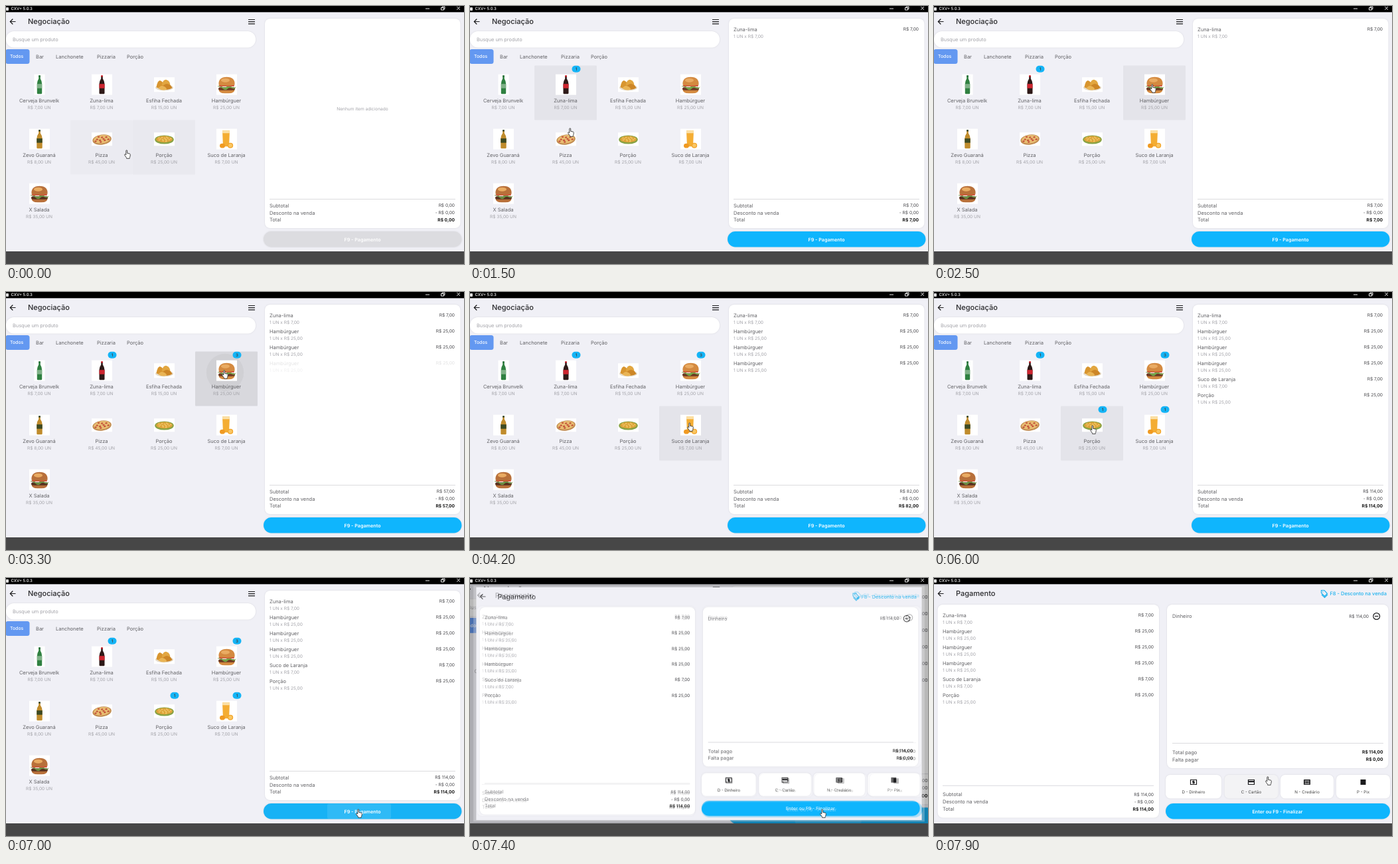
Recreate the animation shown at these times as an HTML page. Size 690 by 388 pixels, loop 8 s.

```html
<!DOCTYPE html>
<html lang="pt-BR">
<head>
<meta charset="utf-8">
<title>Negociação</title>
<style>
  html, body { margin: 0; width: 100%; height: 100%; overflow: hidden; background: #474747; }
  svg { display: block; width: 690px; height: 388px; }
  text { font: 400 7.5px Inter, "Open Sans", sans-serif; fill: #626266; text-rendering: geometricPrecision; white-space: pre; }
  .h { font-size: 11px; font-weight: 500; fill: #2a2a2d; }
  .g { font-size: 6.6px; fill: #a4a4aa; }
  .v { font-size: 6.6px; fill: #4a4a4e; }
  .b { font-size: 6.7px; font-weight: 700; fill: #1a1a1a; }
  .w { font-size: 7.2px; font-weight: 600; fill: #fff; }
  .s { font-size: 6.2px; fill: #444; }
  .m { text-anchor: middle; }
  .e { text-anchor: end; }
  .tab { font-size: 6.9px; font-weight: 500; }
  .hint { font-size: 7.4px; }
  .app { font-size: 6px; font-weight: 500; }
  .link { fill: #1fb2ee; font-weight: 500; }
  .card { fill: #fff; filter: drop-shadow(0 .6px 1px rgba(0,0,0,.1)); }
  .line { fill: none; stroke: #d2d2d6; stroke-width: .8; }
  .ico { fill: none; stroke: #1c1c1e; stroke-width: 1.2; }
  .zoom { transform-origin: 345px 189px; }
</style>
</head>
<body>
<svg id="stage" viewBox="0 0 690 388"></svg>
<script>
const LOOP = 8000;
const BG = '#f0f0f6', BLUE = '#0fb5fd';

// name, price, picture
const products = [
  ['Cerveja Brunvelk', 7, 'beer'], ['Zuna-lima', 7, 'soda'],
  ['Esfiha Fechada', 15, 'pastry'], ['Hambúrguer', 25, 'burger'],
  ['Zevo Guaraná', 8, 'guarana'], ['Pizza', 45, 'pizza'],
  ['Porção', 25, 'portion'], ['Suco de Laranja', 7, 'juice'],
  ['X Salada', 35, 'salad']
];

// time, product index
const clicks = [[1000, 1], [2550, 3], [2850, 3], [3200, 3], [4400, 7], [5500, 6]];

// time, x, y
const path = [
  [-300, 250, 221], [-130, 188, 223], [0, 183, 223], [700, 146, 126], [1300, 146, 126],
  [1500, 152, 190], [1850, 205, 186], [2300, 330, 124], [3450, 330, 124],
  [4150, 332, 203], [4800, 332, 203], [5100, 296, 209], [5400, 240, 207],
  [6050, 240, 207], [6800, 532, 354], [7500, 532, 354], [7800, 499, 290],
  [7900, 504, 305], [8000, 504, 305]
];

const money = n => `R$ ${n},00`;
const ramp = (t, from, len) => Math.min(1, Math.max(0, (t - from) / len));
const text = (x, y, s, cls = '', id = '') =>
  `<text x="${x}" y="${y}" dy=".36em" class="${cls}"${id && ` id="${id}"`}>${s}</text>`;
const rect = (x, y, w, h, r = 0, extra = '') =>
  `<rect x="${x}" y="${y}" width="${w}" height="${h}" rx="${r}" ${extra}/>`;
const fill = c => `fill="${c}"`;
const shape = (d, c) => `<path d="${d}" fill="${c}"/>`;
const oval = (x, y, rx, ry, c) => `<ellipse cx="${x}" cy="${y}" rx="${rx}" ry="${ry}" fill="${c}"/>`;
const hline = (x1, x2, y) => `<path class="line" d="M${x1} ${y}H${x2}"/>`;
const white = (w, h) => rect(-w / 2, -h / 2, w, h, 0, fill('#fff'));

function bottle(w, body, label, cap) {
  return shape(`M-1.3 -13H1.3V-9Q${w} -5 ${w} -1V12.5Q${w} 14 ${w - 1.2} 14H${1.2 - w}Q${-w} 14 ${-w} 12.5V-1Q${-w} -5 -1.3 -9Z`, body) +
    rect(-w, -1, 2 * w, 6.5, 0, fill(label)) + rect(-1.5, -14, 3, 2.4, .5, fill(cap));
}

function burger(bun, leaf, meat) {
  return white(31, 31) +
    shape('M-12 7H12Q12 13 3 13H-3Q-12 13 -12 7Z', bun) +
    rect(-12.5, 4, 25, 4.5, 2.2, fill(meat)) +
    shape('M-14.5 3Q-11 0 -7 3T0 3T7 3T14.5 3Q12 8 8 5.5T1 6.5T-6 6T-14.5 3Z', leaf) +
    rect(-11.5, .3, 23, 2.4, 1.2, fill('#d2553a')) +
    shape('M-12 .5Q-13 -11.5 0 -11.5T12 .5Q0 2.5 -12 .5Z', bun) +
    oval(-2, -6.5, 6.5, 3, '#e9ab62');
}

const dots = (n, rx, ry, c, r) => Array.from({ length: n }, (_, i) => {
  const a = i * 2.4, k = Math.sqrt((i + .5) / n);
  return oval((Math.cos(a) * k * rx).toFixed(1), (Math.sin(a) * k * ry).toFixed(1), r, r * .7, c);
}).join('');

const pictures = {
  beer: white(16, 31) + bottle(3.7, '#2f8040', '#7fb187', '#27703a'),
  soda: white(31, 31) + bottle(4, '#2e1a18', '#cf2630', '#c9202a'),
  guarana: white(31, 31) + bottle(4.2, '#c08c2c', '#3c4a24', '#2e3f22'),
  pastry: white(31, 22) + oval(0, 4.5, 13.5, 4.5, '#e6dccb') +
    shape('M-12 4Q-10 -7 -6 -6T1 3Q-5 8 -12 4Z', '#d8952f') +
    shape('M-4 0Q-1 -9 4 -7T9 2Q2 5 -4 0Z', '#e2a640') +
    shape('M-5 6Q0 -2 5 -1T12 5Q4 10 -5 6Z', '#cd8627') +
    shape('M-9 6Q-6 1 -2 2T4 7Q-2 10 -9 6Z', '#e9b455'),
  burger: burger('#d48a40', '#74a548', '#6d3a24'),
  salad: burger('#b8703a', '#6d9044', '#56301f'),
  pizza: white(31, 20) + '<g transform="rotate(-8)">' + oval(0, .8, 14.3, 7.6, '#c08a50') +
    oval(0, .2, 12.5, 6.2, '#e8bd72') + dots(10, 11, 5.2, '#c4523a', 1.7) + '</g>',
  portion: white(31, 20) + oval(0, .8, 14.3, 6.6, '#88a345') + oval(0, .2, 12.3, 4.8, '#dca338') + dots(14, 10, 3.8, '#efc667', 1.3),
  juice: white(31, 31) + shape('M-6.5 -13H4.5L3.5 11H-5.5Z', '#f4ad33') +
    shape('M-6.5 -13H4.5L4.3 -9H-6.3Z', '#fbe0a6') +
    oval(-6.5, 10, 4, 3.4, '#f09a22') + oval(5.5, 9.5, 4.2, 4, '#f3a52c') + oval(5.5, 9.5, 2.8, 2.6, '#f9c765')
};

const tileBox = i => ({ x: 3 + 94 * (i % 4), y: 89.5 + 82 * Math.floor(i / 4), w: 94, h: 82 });

function tile([name, price, pic], i) {
  const { x, y, w, h } = tileBox(i), cx = x + 47;
  return rect(x, y, w, h, 1, `id="hover${i}" opacity="0"`) +
    `<circle id="ripple${i}" opacity="0"/>` +
    `<g transform="translate(${cx + .5} ${y + 28.7})">${pictures[pic]}</g>` +
    text(cx, y + 52.5, name, 'm') + text(cx, y + 63.2, money(price) + ' UN', 'g m') +
    `<g id="badge${i}" opacity="0">` + rect(cx + 9.5, y + .3, 13, 10, 5, fill('#14b4f6')) +
    text(cx + 16, y + 5.3, '1', 'w s m', `count${i}`) + '</g>';
}

const cartRows = (x, right, y, id) => clicks.map(([, p], i) => {
  const [name, price] = products[p], cy = y + 24 * i;
  return `<g id="${id}${i}">` + text(x, cy, name) + text(right, cy, money(price), 'v e') +
    text(x, cy + 10.8, '1 UN x ' + money(price), 'g') + '</g>';
}).join('');

const totals = (x, right, y, id) =>
  text(x, y, 'Subtotal') + text(right, y, money(114), 'v e', id + 'Sub') +
  text(x, y + 10.8, 'Desconto na venda') + text(right, y + 10.8, '- R$ 0,00', 'v e') +
  text(x, y + 21.6, 'Total') + text(right, y + 21.6, money(114), 'b e', id + 'Sum');

const arrow = '<path class="ico" d="M14.5 23.5H6.5M10.3 19.5L6.3 23.5L10.3 27.5"/>';

const shop = rect(0, 9, 690, 360, 0, fill(BG)) + arrow + text(33, 23.5, 'Negociação', 'h') +
  '<path class="ico" d="M365 20.5H375M365 23.7H375M365 26.9H375"/>' +
  rect(0, 38, 376, 24.5, 12, 'class="card"') + text(10, 50, 'Busque um produto', 'g hint') +
  rect(-.5, 65, 36, 22, 3.5, fill('#6398f1')) + text(6, 76, 'Todos', 'w tab') +
  text(45, 76, 'Bar') + text(75, 76, 'Lanchonete') + text(137, 76, 'Pizzaria') + text(182, 76, 'Porção') +
  products.map(tile).join('') +
  rect(390, 19, 294.5, 315, 8, 'class="card"') +
  text(537, 155, 'Nenhum item adicionado', 'g m', 'empty') +
  cartRows(397, 676, 35, 'row') + hline(397, 677, 290.5) + totals(397, 676, 300, 'cart') +
  rect(388, 339, 298.5, 23.5, 11.7, 'class="card" id="payBtn"') +
  rect(484, 339.5, 96, 22.5, 2, 'fill="#fff" id="payGlow" opacity="0"') +
  text(537, 351, 'F9 - Pagamento', 'w m');

const methods = [
  [349, 84, 'D - Dinheiro'], [437.5, 81, 'C - Cartão'], [522, 80, 'N - Crediário'], [606, 81, 'P - Pix']
];
const icons = [
  '<path class="ico" d="M-4.5 -3.5H4.5V3.5H-4.5Z"/><path class="ico" d="M1.5 -1.5H-1.2V0H1.2V1.5H-1.5M0 -2.4V2.4"/>',
  '<path class="ico" d="M-4.5 -3.5H4.5V3.5H-4.5Z"/>' + rect(-4.5, -2, 9, 2.2, 0, fill('#1c1c1e')),
  rect(-5, -4, 10, 8, .8, fill('#1c1c1e')) + '<path d="M-3.6 -2H3.6M-3.6 2.4H3.6M-2.6 -.8V1.3M0 -.8V1.3M2.6 -.8V1.3" stroke="#fff" stroke-width=".8"/>',
  rect(-4, -4, 8, 8, 0, fill('#1c1c1e'))
];

const pay = rect(0, 9, 690, 360, 0, fill(BG)) + arrow + text(33, 23.5, 'Pagamento', 'h') +
  '<path d="M583.5 18.5H588L592.5 23.5L588.5 27.5L583.5 22.5ZM584 25L588.5 29.5L593 25" fill="none" stroke="#1fb2ee" stroke-width="1.2"/>' +
  '<circle cx="585.8" cy="20.8" r=".8" fill="#1fb2ee"/>' +
  text(682, 23.5, 'F8 - Desconto na venda', 'e link') +
  rect(5.5, 40, 333.5, 320.5, 8, 'class="card"') + cartRows(13, 331, 56, 'paid') +
  hline(13, 331, 312.3) + totals(13, 331, 325.5, 'pay') +
  rect(351, 40, 333.5, 246, 8, 'class="card"') + text(359, 57.5, 'Dinheiro') + text(655, 57.5, money(114), 'v e') +
  '<circle class="ico" cx="666.7" cy="57.5" r="4.9"/><path class="ico" d="M664 57.5H669.4"/>' +
  hline(359, 677, 248.5) +
  text(359, 262, 'Total pago') + text(676.5, 262, money(114), 'b e') +
  text(359, 272.8, 'Falta pagar') + text(676.5, 272.8, money(0), 'b e') +
  methods.map(([x, w, label], i) =>
    rect(x, 296, w, 35.5, 7, `class="card" id="method${i}"`) +
    `<g transform="translate(${x + w / 2} 307)">${icons[i]}</g>` + text(x + w / 2, 322, label, 's m')).join('') +
  rect(349, 339, 338, 23.5, 11.7, `class="card" style="fill:${BLUE}"`) +
  text(517.5, 351, 'Enter ou F9 - Finalizar', 'w m');

const titleBar = rect(0, 0, 690, 9.3, 0, fill('#000')) + rect(0, 2, 4, 5, 1, fill('#ddd')) +
  text(7.5, 4, 'CXV+ 5.0.3', 'w app') +
  '<path d="M632 4H638M655.5 2.5H659.5V6H655.5ZM657 2.5V1H661V4.6H659.5M679.3 1L684 5.7M684 1L679.3 5.7" fill="none" stroke="#fff" stroke-width=".9"/>';

document.getElementById('stage').innerHTML =
  '<clipPath id="view">' + rect(0, 9, 690, 360) + '</clipPath>' +
  rect(0, 0, 690, 388, 0, fill('#474747')) +
  `<g clip-path="url(#view)"><g id="shop" class="zoom">${shop}</g>` +
  rect(0, 9, 690, 360, 0, 'id="scrim" opacity="0"') +
  `<g id="pay" class="zoom"><g id="paper">${pay}</g></g>` +
  '<g id="trail" class="zoom"><use href="#paper"/></g></g>' + titleBar +
  '<path id="hand" fill="#fff" stroke="#333" stroke-width=".9" stroke-linejoin="round" d="M-2.2 -5.2c0-1.3 1.9-1.3 1.9 0v3.6l3.3.7c1 .2 1.4.8 1.3 1.8l-.5 2.9c-.1.6-.3 1-.6 1.4v1.1h-4.6v-1l-2.8-3.9c-.8-1.1.5-2 1.3-1.2l.7.8z"/>';

const el = {};
document.querySelectorAll('[id]').forEach(e => el[e.id] = e);
const set = (id, attrs) => { for (const k in attrs) el[id].setAttribute(k, attrs[k]); };
const zoom = (id, s, show) => {
  el[id].style.transform = `scale(${s})`;
  el[id].style.opacity = show;
};

function pointer(t) {
  let i = 1;
  while (i < path.length - 1 && path[i][0] < t) i++;
  const [t0, x0, y0] = path[i - 1], [t1, x1, y1] = path[i];
  const u = ramp(t, t0, t1 - t0), k = u * u * (3 - 2 * u);
  return [x0 + (x1 - x0) * k, y0 + (y1 - y0) * k];
}

// Share of the recent past the pointer spent inside a box
function hover(t, { x, y, w, h }) {
  let hits = 0;
  for (let i = 0; i < 12; i++) {
    const [px, py] = pointer(t - 80 - i * 15);
    if (px >= x && px < x + w && py >= y && py < y + h) hits++;
  }
  return hits / 12;
}

function drawTile(t, i) {
  const mine = clicks.filter(c => c[1] === i && c[0] <= t);
  const age = mine.length ? t - mine[mine.length - 1][0] : 9999;
  const press = 1 - ramp(age, 200, 300);
  set('hover' + i, { opacity: .05 * hover(t, tileBox(i)) + .05 * press });
  const [x, y] = pointer(t);
  set('ripple' + i, { cx: x, cy: y - 3, r: 8 + 24 * ramp(age, 0, 120), opacity: .04 * press });
  set('badge' + i, { opacity: mine.length ? 1 : 0 });
  el['count' + i].textContent = mine.length || 1;
}

function draw(t) {
  products.forEach((_, i) => drawTile(t, i));

  let sum = 0;
  clicks.forEach(([at, p], i) => {
    if (t >= at + 150) sum += products[p][1];
    set('row' + i, { opacity: ramp(t, at + 60, 250) });
  });
  el.cartSub.textContent = el.cartSum.textContent = money(sum);
  set('empty', { opacity: 1 - ramp(t, 1060, 100) });
  el.payBtn.style.fill = !sum ? '#dcdce0' : t > 6750 ? '#17b2f5' : BLUE;
  set('payGlow', { opacity: .1 * ramp(t, 6900, 100) });

  // The new page zooms in over the old one, with a faint trail
  const u = ramp(t, 7200, 350), p = 1 - (1 - u) ** 2, s = .85 + .15 * p;
  const seen = ramp(t, 7230, 80);
  zoom('shop', 1 + .05 * p, 1);
  set('scrim', { opacity: .28 * ramp(u, 0, .5) });
  zoom('pay', s, seen);
  zoom('trail', 1 - (1 - s) * .55, u < 1 ? seen * .3 : 0);
  el.method1.style.fill = t > 7840 ? '#f3f3f5' : '#fff';

  const [x, y] = pointer(t);
  set('hand', { transform: `translate(${x} ${y})` });
}

const start = performance.now();
function tick() {
  draw((performance.now() - start) % LOOP);
  requestAnimationFrame(tick);
}
tick();
</script>
</body>
</html>
```
